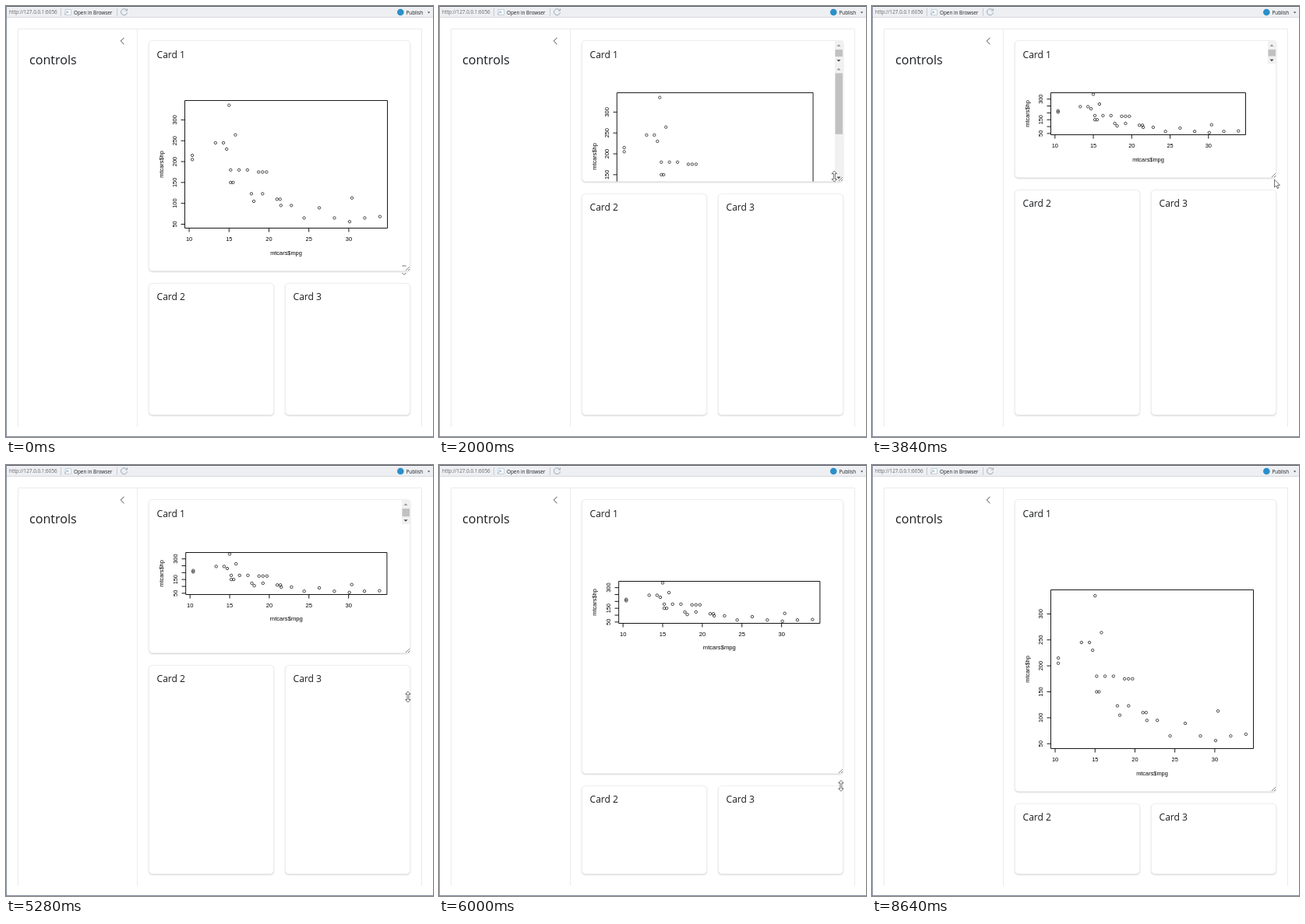
An HTML page for the animation above (9.52 s loop, 548 by 554 pixels).

```html
<!DOCTYPE html>
<html lang="en">
<head>
<meta charset="utf-8">
<title>Resizable cards</title>
<style>
  html, body { margin: 0; width: 100%; height: 100%; overflow: hidden; background: #fff; }
  #stage { position: relative; width: 548px; height: 554px; overflow: hidden; background: #fff; }
  #toolbar { position: absolute; inset: 0 0 auto; height: 14px; background: #edeff2; border-bottom: 1px solid #d6d9dd; }
  .card {
    position: absolute; box-sizing: border-box; background: #fff;
    border: 1px solid #eee; border-radius: 5px; box-shadow: 0 1px 2px rgba(0, 0, 0, .16);
  }
  #card1 { left: 183px; top: 44px; width: 336px; }
  #card2, #card3 { width: 161px; bottom: 28px; }
  #card2 { left: 183px; }
  #card3 { left: 358px; }
  svg { position: absolute; left: 0; top: 0; }
  text { font-family: "Open Sans", sans-serif; fill: #1b1d20; }
  .ui { font-size: 6.35px; }
  .title { font-size: 12.1px; }
  .plot text { font: 7.4px "Liberation Sans", sans-serif; fill: #000; text-anchor: middle; }
  .plot path, .plot circle { fill: none; stroke: #000; stroke-width: .9; }
  .plot circle { stroke-width: .7; }
  .pointer { fill: #fff; stroke: #333; stroke-width: .7; stroke-linejoin: round; }
</style>
</head>
<body>
<div id="stage">
  <div id="toolbar"></div>
  <div class="card" id="card1"></div>
  <div class="card" id="card2"></div>
  <div class="card" id="card3"></div>
  <svg width="548" height="554" viewBox="0 0 548 554">
    <defs><clipPath id="bodyClip"><rect id="bodyRect" x="183" width="336"/></clipPath></defs>

    <path d="M0 .5H548" stroke="#555a68"/>
    <path d="M.5 0V554M0 553.5H548" stroke="#858b9d"/>
    <path d="M70.5 3V13M142.5 3V13" stroke="#c6cad0"/>
    <text class="ui" x="4" y="10.4" style="fill:#666">http://127.0.0.1:6056</text>
    <path d="M76 4.5H83.5V11.5H76Z" fill="#fff" stroke="#b8c4d0" stroke-width=".8"/>
    <path d="M75 11L79 7.5M77 7H79.5V9.5" fill="none" stroke="#7fa6c9" stroke-width=".8"/>
    <text class="ui" x="87" y="10.8">Open in Browser</text>
    <path d="M154.5 5A4 4 0 1 0 155.5 8.5M155.5 3.5V6H153" fill="none" stroke="#8f9fb1" stroke-width=".9"/>
    <circle cx="506.3" cy="8" r="4.3" fill="#2b8fc9"/>
    <text class="ui" x="513.5" y="10.8">Publish</text>
    <path d="M541 7.5H544.2L542.6 9.5Z" fill="#444"/>

    <path d="M15.5 541V29.5H533.5V541M168.5 29.5V541" fill="none" stroke="#eaebed"/>
    <path d="M151.5 40.8L147.3 45L151.5 49.2" fill="none" stroke="#333" stroke-width=".9"/>
    <text x="30" y="75" font-size="16.1">controls</text>
    <text class="title" x="193.5" y="67">Card 1</text>
    <g id="lowerTitles">
      <text class="title" x="193.5" y="37">Card 2</text>
      <text class="title" x="368.5" y="37">Card 3</text>
    </g>

    <g id="plots" clip-path="url(#bodyClip)"></g>
    <g id="bars"></g>
    <path id="grip" d="M513 -1L518 -6M516 -1L518 -3" stroke="#555" stroke-width=".7"/>
    <path id="arrow" class="pointer" d="M0 0V10L2.3 7.9L3.9 11.6L5.4 10.9L3.9 7.3H7Z"/>
    <g id="resizer" class="pointer">
      <path id="shaft" d="M0 -7L3.2 -3.5H1V3.5H3.2L0 7L-3.2 3.5H-1V-3.5H-3.2Z"/>
      <path id="heads" d="M-2.5 -5H2.5M-2.5 4L0 6.5L2.5 4"/>
    </g>
  </svg>
</div>
<script>
const LOOP = 9520, STEP = 80;
const FLAT_AT = 3040, STRETCH_AT = 5280, TALL_AT = 7360;
const IMAGE_WIDTH = 314, BAR_WIDTH = 10, CONTENT_HEIGHT = 249;
const $ = id => document.getElementById(id);
const mix = (a, b, p) => a + (b - a) * p;
const progress = (t, from, to) => Math.min(1, Math.max(0, (t - from) / (to - from)));
const easeIn = p => p ** 3;
const easeOut = p => 1 - (1 - p) ** 2;
const bump = p => Math.sin(Math.PI * p);

// Points are [mpg, hp]: loners, evenly spaced rows of equal power, and a damped tail.
function samplePoints() {
  const points = [[10.4, 205], [10.4, 215], [14.7, 230], [15, 335], [15.8, 264], [18.1, 105], [30.4, 113]];
  const row = (hp, first, gap, count) => {
    for (let i = 0; i < count; i++) points.push([first + gap * i, hp]);
  };
  row(245, 13.3, 1, 2);
  row(180, 15.2, 1.05, 3);
  row(175, 18.7, .5, 3);
  row(150, 15.2, .3, 2);
  row(123, 17.8, 1.4, 2);
  row(110, 21, .4, 2);
  row(95, 21.5, 1.3, 2);
  for (let i = 0; i < 6; i++) {
    points.push([24.4 + 1.9 * i, 65 + 40 * Math.exp(-i / 2) * Math.sin(i * Math.PI / 2)]);
  }
  return points;
}
const points = samplePoints();

// Scatter plot with its origin at the image's left edge and the frame's top.
function makePlot(width, height, hasLabel) {
  const left = 36, right = width - 18;
  const x = v => mix(left, right, (v - 9.46) / 25.38);
  const y = v => mix(height, 0, (v - 40.68) / 305.64);
  const upright = (cx, cy, label) =>
    `<text transform="translate(${cx} ${cy}) rotate(-90)">${label}</text>`;
  let path = `M${left} 0H${right}V${height}H${left}Z`;
  let marks = '';
  for (let v = 10; v <= 30; v += 5) {
    path += `M${x(v)} ${height}v5`;
    marks += `<text x="${x(v)}" y="${height + 16.5}">${v}</text>`;
  }
  for (let v = 50; v <= 300; v += 50) {
    path += `M${left} ${y(v)}h-5`;
    if (hasLabel(v)) marks += upright(25.5, y(v), v);
  }
  for (const [mpg, hp] of points) marks += `<circle cx="${x(mpg)}" cy="${y(hp)}" r="1.7"/>`;
  marks += `<text x="${(left + right) / 2}" y="${height + 34}">mtcars$mpg</text>`;
  marks += upright(8.5, height / 2, 'mtcars$hp');
  const g = document.createElementNS('http://www.w3.org/2000/svg', 'g');
  g.setAttribute('class', 'plot');
  g.innerHTML = `<path d="${path}"/>${marks}`;
  $('plots').append(g);
  return { g, width };
}

const initial = makePlot(IMAGE_WIDTH, 164, () => true);
const flat = makePlot(IMAGE_WIDTH - BAR_WIDTH, 54, v => v === 50 || v % 150 === 0);
const tall = makePlot(IMAGE_WIDTH, 204, () => true);

// The card is dragged up in two pulls and later down in one.
function cardBottom(t) {
  if (t < 1680) return mix(341, 267, easeIn(progress(t, 1040, 1600)));
  if (t < 5200) return mix(267, 221, easeOut(progress(t, 1680, 2160)));
  return mix(221, 420, easeOut(progress(t, 5215, 6400)));
}

// While dragging, the card trails the pointer by a moment.
function resizerAt(t) {
  const y = cardBottom(t + 200) - 2;
  if (t < 2880) return [mix(511, 507, progress(t, 0, 2160)), y];
  const p = progress(t, 5200, 6160);
  return [mix(513, 509, p) + 12.5 * bump(p), y];
}

function arrowAt(t) {
  if (t < 3800) {
    const p = progress(t, 2800, 3760);
    return [mix(507, 516.5, p) + 23 * bump(p), mix(219, 223, p) + 3 * bump(p)];
  }
  if (t < 4400) {
    const p = progress(t, 3840, 4400);
    return [mix(516.5, 513, p), mix(223, 219, p)];
  }
  if (t < 7760) return [517, 405];
  if (t < 8000) return [536, 82];
  const p = progress(t, 8240, 8560);
  return [mix(492, 418, p), mix(46, 2, p)];
}

function scrollbar(top, bottom, thumbBottom) {
  const tip = (y, d, color) => `<path d="M510.5 ${y}h5l-2.5 ${d}Z" fill="${color}"/>`;
  return `<path d="M508 ${top}h10.500V${bottom}h-10.500Z" fill="#f1f1f1"/>` +
    `<path d="M508.5 ${top + 11.5}h9.500V${thumbBottom}h-9.500Z" fill="#c1c1c1"/>` +
    tip(top + 7.5, -2.7, '#999') + tip(bottom - 6, 2.7, '#444');
}

const show = (el, on) => el.style.display = on ? '' : 'none';
const move = (el, [x, y]) => el.setAttribute('transform', `translate(${x} ${y})`);

function render(t) {
  const bottom = Math.round(cardBottom(t));
  const tightHeader = 75 + (bottom - 227) * .078;
  const looseHeader = 85 + (bottom - 341) * .494;
  const header = Math.max(tightHeader, looseHeader);
  const plot = t < FLAT_AT ? initial : t < TALL_AT ? flat : tall;
  const view = bottom - header;
  const bodyScrolls = plot === initial && view < CONTENT_HEIGHT;
  const narrow = bodyScrolls || (plot === flat && t < STRETCH_AT);
  const scale = (IMAGE_WIDTH - (narrow ? BAR_WIDTH : 0)) / plot.width;

  $('card1').style.height = `${bottom - 44}px`;
  for (const id of ['card2', 'card3']) $(id).style.top = `${bottom + 15}px`;
  move($('lowerTitles'), [0, bottom]);
  move($('grip'), [0, bottom]);

  for (const p of [initial, flat, tall]) show(p.g, p === plot);
  plot.g.setAttribute('transform',
    `translate(193.5 ${Math.round(header + 37) - .5}) scale(${scale} 1)`);
  $('bodyRect').setAttribute('y', header);
  $('bodyRect').setAttribute('height', view - .5);

  let bars = '';
  if (tightHeader > looseHeader) bars += scrollbar(44.5, header, header - 10);
  if (bodyScrolls) {
    bars += scrollbar(header, bottom - .5, header + 11.5 + (view - 22) * view / CONTENT_HEIGHT);
  }
  $('bars').innerHTML = bars;

  const visible = t < 7760 || (t >= 7920 && t < 8640);
  const isArrow = (t >= 2880 && t < 4400) || t >= 7680;
  show($('arrow'), visible && isArrow);
  show($('resizer'), visible && !isArrow);
  show($('shaft'), t >= 160);
  show($('heads'), t < 160);
  move($('arrow'), arrowAt(t));
  move($('resizer'), resizerAt(t));
}

const start = performance.now();
function tick() {
  const t = (performance.now() - start) % LOOP;
  render(Math.floor(t / STEP) * STEP);
  requestAnimationFrame(tick);
}
tick();
</script>
</body>
</html>
```
